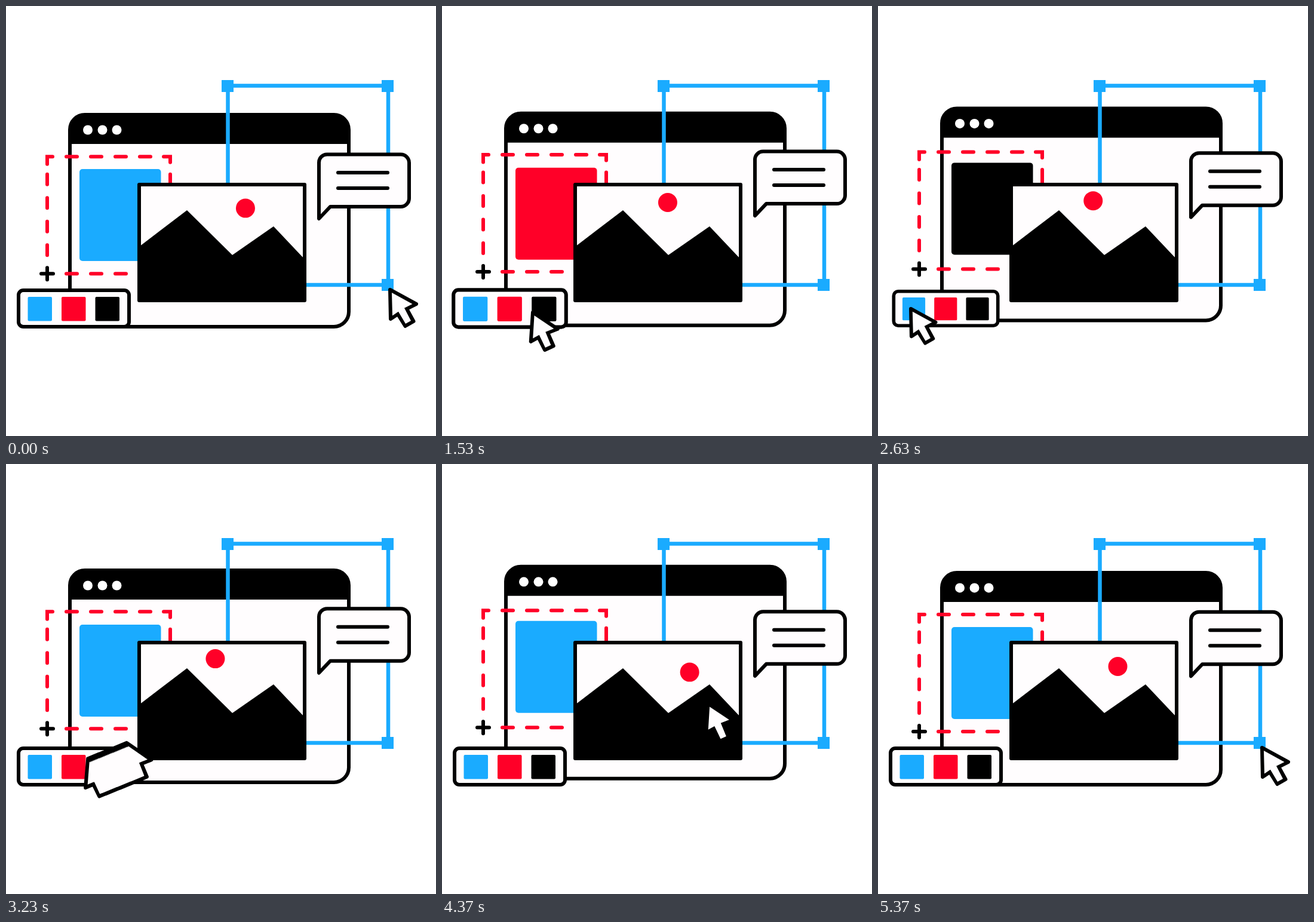
Recreate the animation shown at these times as an HTML page. Size 720 by 720 pixels, loop 5410 ms.

```html
<!DOCTYPE html>
<html lang="en">
<head>
<meta charset="utf-8">
<title>Design workspace</title>
<style>
  html, body { margin: 0; width: 100%; height: 100%; overflow: hidden; background: #fff; }
  svg { display: block; width: 100vw; height: 100vh; }
  .ink { stroke: #000; stroke-width: 6; stroke-linecap: round; stroke-linejoin: round; }
  .paper { fill: #fffdfe; }
  .blue { fill: #1aabff; }
  .red { fill: #ff0028; }
  .dash { fill: none; stroke: #ff0028; stroke-width: 6; stroke-linecap: round; }
</style>
</head>
<body>
<svg viewBox="0 0 720 720">
  <defs>
    <clipPath id="photoClip"><rect x="223" y="299" width="277" height="194"/></clipPath>
  </defs>

  <g id="browser">
    <rect class="ink paper" x="107" y="182" width="467" height="355" rx="25"/>
    <path d="M107 231V207a25 25 0 0 1 25-25H549a25 25 0 0 1 25 25V231Z"/>
    <g fill="#fff">
      <circle cx="137" cy="207.5" r="8"/>
      <circle cx="161.5" cy="207.5" r="8"/>
      <circle cx="185.5" cy="207.5" r="8"/>
    </g>
    <rect id="block" x="123" y="273" width="136.5" height="154" rx="5"/>
  </g>

  <g id="marquee">
    <path class="dash" d="M69 265V252.5H78M264 252.5H275V262M275 282V310"/>
    <path class="dash" stroke-dasharray="18 23" d="M101 252.5H243M101 448.5H204"/>
    <path class="dash" stroke-dasharray="17 22.5" d="M69 282V418"/>
    <path class="ink" d="M59 448.5H79M69 438.5V458.5"/>
  </g>

  <path d="M371.5 300V133.5H640V467H500" fill="none" stroke="#1aabff" stroke-width="6.5"/>
  <g class="blue">
    <rect x="361" y="124" width="20" height="20"/>
    <rect x="629" y="124" width="20" height="20"/>
    <rect x="629" y="457" width="20" height="20"/>
  </g>

  <rect class="paper" x="223" y="299" width="277" height="194"/>
  <g clip-path="url(#photoClip)">
    <circle id="sun" class="red" r="16"/>
    <path d="M223 403L303 342L379 417L448 369L500 424V493H223Z"/>
  </g>
  <rect class="ink" x="223" y="299" width="277" height="194" fill="none"/>

  <g id="bubble">
    <path class="ink paper" d="M524 356V262a13.5 13.5 0 0 1 13.5-13.5H661a14 14 0 0 1 14 14V322a14 14 0 0 1-14 14H543Z"/>
    <path class="ink" d="M556 279H639M556 305H639"/>
  </g>

  <g id="palette">
    <rect class="ink paper" x="21" y="476" width="185" height="61" rx="8"/>
    <rect class="blue" x="36.5" y="487" width="40.5" height="40.5" rx="2"/>
    <rect class="red" x="93" y="487" width="40.5" height="40.5" rx="2"/>
    <rect x="149.5" y="487" width="40.5" height="40.5" rx="2"/>
  </g>

  <path id="cursorEdge" class="ink"/>
  <path id="cursorFace" class="paper"/>
</svg>
<script>
const LOOP = 5410;
const BLUE = '#1aabff', RED = '#ff0028';
const el = id => document.getElementById(id);

const browser = el('browser'), block = el('block'), marquee = el('marquee'), sun = el('sun'),
      bubble = el('bubble'), palette = el('palette'),
      cursorEdge = el('cursorEdge'), cursorFace = el('cursorFace');

const EDGE = [[0, 0], [44, 24], [28, 32], [39.5, 53], [25.5, 61], [13, 41], [1, 49]];
const FACE = [[3, 5], [37.5, 24], [24, 30.7], [35, 52], [26, 57], [14, 36.7], [4, 43.4]];

const ease = p => p < 0.5 ? 4 * p ** 3 : 1 - 4 * (1 - p) ** 3;
const lerp = (a, b, p) => a + (b - a) * p;
const rad = deg => deg * Math.PI / 180;

// Eased interpolation through [time, value] keys, held at both ends.
function track(t, keys) {
  if (t <= keys[0][0]) return keys[0][1];
  for (let i = 1; i < keys.length; i++) {
    const [t0, a] = keys[i - 1], [t1, b] = keys[i];
    if (t < t1) return lerp(a, b, ease((t - t0) / (t1 - t0)));
  }
  return keys[keys.length - 1][1];
}

// The sun drifts left along an arc and is dragged back once per loop.
const GRAB = 3470, DROP = 4000, DRIFT = 0.0104;
function sunAt(t) {
  const drift = s => 30.7 - DRIFT * s;
  let angle = drift(t < DROP ? t : t - LOOP);
  if (t > GRAB && t < DROP) angle = track(t, [[GRAB, drift(GRAB)], [DROP, drift(DROP - LOOP)]]);
  return [355 + 90 * Math.sin(rad(angle)), 416 - 90 * Math.cos(rad(angle))];
}

const HOME = [643, 475], ON_RED = [104, 506], ON_BLACK = [152, 513], ON_BLUE = [55, 507];
const LEGS = [
  { from: HOME, bend: [380, 410], to: ON_RED, keys: [[0, 0], [130, -0.03], [480, 1.13], [700, 1]] },
  { from: ON_RED, bend: [128, 506], to: ON_BLACK, keys: [[1180, 0], [1500, 1]] },
  { from: ON_BLACK, bend: [104, 512], to: ON_BLUE, keys: [[1980, 0], [2350, 1]] },
  { from: ON_BLUE, bend: [240, 496], to: sunAt(GRAB), keys: [[3030, 0], [3450, 1]] },
  { from: sunAt(DROP), bend: [482, 500], to: HOME, keys: [[4181, 0], [4711, 1]] }
];
const TILT = [[0, 0], [700, -1], [1180, -1], [1500, 5], [1980, 5], [2350, 0],
              [2950, 0], [3150, 6], [4370, 5], [4711, 0]];

function tipAt(t) {
  if (t > GRAB && t < DROP) return sunAt(t);
  const leg = LEGS.filter(l => l.keys[0][0] <= t).pop() || LEGS[0];
  const u = track(t, leg.keys), v = 1 - u;
  return [0, 1].map(i => v * v * leg.from[i] + 2 * u * v * leg.bend[i] + u * u * leg.to[i]);
}

const CLICKS = [1080, 1870, 2660];
const PRESS = [[-130, 1], [0, 0.94], [330, 1.03], [600, 1]];
const pressAt = t => CLICKS.reduce((s, c) => s * track(t - c, PRESS), 1);
const blockColor = t => [BLUE, RED, '#000', BLUE][CLICKS.filter(c => t >= c).length];

function outline(points, [x, y], tilt, scale) {
  const c = Math.cos(tilt) * scale, s = Math.sin(tilt) * scale;
  return 'M' + points.map(([px, py]) =>
    (x + px * c - py * s).toFixed(2) + ' ' + (y + px * s + py * c).toFixed(2)).join('L') + 'Z';
}

// Fast moves stretch the cursor into a smear between two moments.
function drawCursor(t, scale) {
  const tip = tipAt(t), past = tipAt(Math.max(0, t - 38));
  const gap = Math.hypot(tip[0] - past[0], tip[1] - past[1]);
  const steps = gap > 40 ? Math.ceil(gap / 2) : 0;
  const tilt = rad(track(t, TILT));
  let edge = '', face = '';
  for (let i = 0; i <= steps; i++) {
    const p = steps ? i / steps : 0;
    const at = [lerp(tip[0], past[0], p), lerp(tip[1], past[1], p)];
    edge += outline(EDGE, at, tilt, scale);
    face += outline(FACE, at, tilt, scale);
  }
  cursorEdge.setAttribute('d', edge);
  cursorFace.setAttribute('d', face);
}

function shiftY(node, y) {
  node.setAttribute('transform', `translate(0 ${y.toFixed(2)})`);
}

function render(t) {
  const phase = 360 * 3 * t / LOOP;
  const wave = lag => Math.cos(rad(phase - lag));
  shiftY(browser, 5.4 * (wave(0) - 1));
  shiftY(marquee, 4.6 * wave(25) - 4.4);
  shiftY(bubble, 5.4 * wave(70) - 1.85);

  block.setAttribute('fill', blockColor(t));
  const [x, y] = sunAt(t);
  sun.setAttribute('cx', x);
  sun.setAttribute('cy', y);

  const press = pressAt(t);
  palette.setAttribute('transform', `translate(113.5 506.5) scale(${press}) translate(-113.5 -506.5)`);
  drawCursor(t, Math.min(1, press));
}

const start = performance.now();
function tick() {
  render((performance.now() - start) % LOOP);
  requestAnimationFrame(tick);
}
tick();
</script>
</body>
</html>
```
